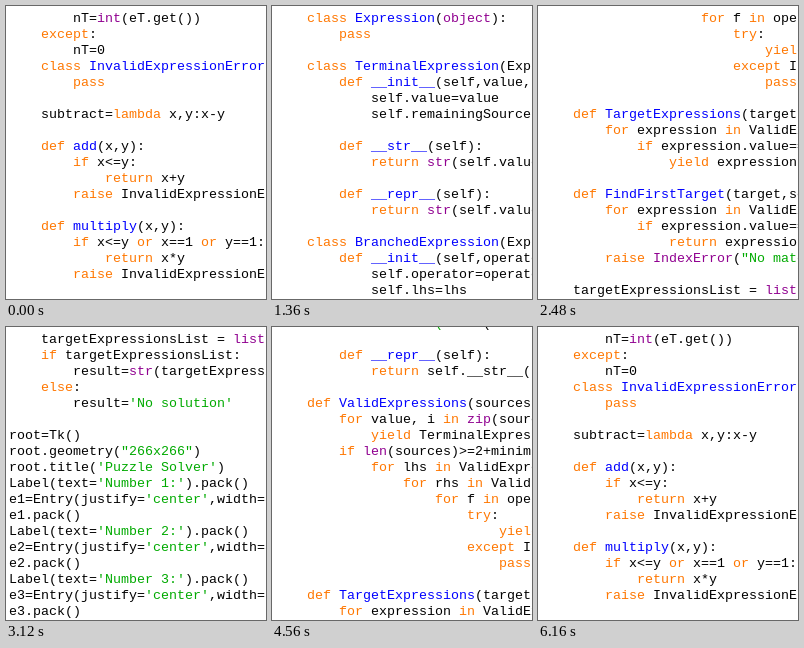
Write an HTML page with a canvas that moves like this. It is 260 px wide and 293 px high and loops after 6.24 s.

```html
<!DOCTYPE html>
<html lang="en">
<head>
<meta charset="utf-8">
<title>Scrolling code</title>
<style>
html, body { margin: 0; width: 100%; height: 100%; overflow: hidden; background: #fff; }
canvas { display: block; }
</style>
</head>
<body>
<canvas id="stage" width="260" height="293"></canvas>
<script id="code" type="text/plain">
        nT=int(eT.get())
    except:
        nT=0
    class InvalidExpressionError(Exception):
        pass

    subtract=lambda x,y:x-y

    def add(x,y):
        if x<=y:
            return x+y
        raise InvalidExpressionError

    def multiply(x,y):
        if x<=y or x==1 or y==1:
            return x*y
        raise InvalidExpressionError

    def divide(x,y):
        if not y or x%y or y==1:
            raise InvalidExpressionError
        return x/y
    def power(x,y):
        if x<=y or x==1 or y==1:
            return x**y
        raise InvalidExpressionError

    add.displayString='+'   #The symbols
    multiply.displayString='*'
    subtract.displayString='-'
    divide.displayString='/'
    power.displayString='**'
    standardOperators=[add, subtract, multiply, divide, power]

    class Expression(object):
        pass

    class TerminalExpression(Expression):
        def __init__(self,value,remainingSources):
            self.value=value
            self.remainingSources=remainingSources

        def __str__(self):
            return str(self.value)

        def __repr__(self):
            return str(self.value)

    class BranchedExpression(Expression):
        def __init__(self,operator,lhs,rhs):
            self.operator=operator
            self.lhs=lhs
            self.rhs=rhs
            self.value=operator(lhs.value,rhs.value)
            self.remainingSources=rhs.remainingSources

        def __str__(self):
            return '('+str(self.lhs)+self.operator.displayString+str(self.rhs)+')'

        def __repr__(self):
            return self.__str__()

    def ValidExpressions(sources,operators=standardOperators):
        for value, i in zip(sources,range(len(sources))):
            yield TerminalExpression(value,sources[:i]+sources[i+1:])
        if len(sources)>=2+minimum:
            for lhs in ValidExpressions(sources,operators):
                for rhs in ValidExpressions(lhs.remainingSources):
                    for f in operators:
                        try:
                            yield BranchedExpression(f,lhs,rhs)
                        except InvalidExpressionError:
                            pass

    def TargetExpressions(target,sources):
        for expression in ValidExpressions(sources):
            if expression.value==target:
                yield expression

    def FindFirstTarget(target,sources):
        for expression in ValidExpressions(sources):
            if expression.value==target:
                return expression
        raise IndexError("No matching expressions")

    targetExpressionsList = list(TargetExpressions(nT,numbers))
    if targetExpressionsList:
        result=str(targetExpressionsList[0])
    else:
        result='No solution'

root=Tk()
root.geometry("266x266")
root.title('Puzzle Solver')
Label(text='Number 1:').pack()
e1=Entry(justify='center',width=5)
e1.pack()
Label(text='Number 2:').pack()
e2=Entry(justify='center',width=5)
e2.pack()
Label(text='Number 3:').pack()
e3=Entry(justify='center',width=5)
e3.pack()
Label(text='Number 4:').pack()
e4=Entry(justify='center',width=5)
e4.pack()
Label(text='Target:').pack()
eT=Entry(justify='center',width=5)
eT.pack()
solve=Button(text='Solve',command=Solve)
solve.pack()
root.mainloop()
</script>
<script>
const ctx = document.getElementById('stage').getContext('2d');
const lines = document.getElementById('code').textContent.replace(/^\n/, '').split('\n');

const STEP = 80, STEPS = 78, LINE = 16, CHAR = 8, LEFT = 3, BASE = 16;
const COLORS = {
  text: '#000000', keyword: '#ff7700', name: '#0000ff',
  builtin: '#900090', string: '#00aa00', comment: '#dd0000'
};
const KEYWORDS = new Set(('class def pass lambda if or not return raise for in yield try ' +
  'except else').split(' '));
const BUILTINS = new Set('int str zip len range list object Exception IndexError'.split(' '));

// [step, first visible line]
const SCROLL = [[0, 0], [17, 34], [31, 68], [44, 95], [47, 92], [57, 58], [69, 15], [77, 0]];

function tokenize(line) {
  const tokens = [];
  let last = '';
  for (const m of line.matchAll(/#.*|'[^']*'|"[^"]*"|\w+|[^\s\w#'"]+/g)) {
    const word = m[0];
    let kind = 'text';
    if (word[0] === '#') kind = 'comment';
    else if (/^['"]/.test(word)) kind = 'string';
    else if (last === 'def' || last === 'class') kind = 'name';
    else if (KEYWORDS.has(word)) kind = 'keyword';
    else if (BUILTINS.has(word) && !last.endsWith('.')) kind = 'builtin';
    tokens.push({ word, col: m.index, color: COLORS[kind] });
    last = word;
  }
  return tokens;
}

const rows = lines.map(tokenize);

function topLine(step) {
  const i = SCROLL.findIndex(k => k[0] >= step);
  if (i === 0) return SCROLL[0][1];
  const [s0, l0] = SCROLL[i - 1], [s1, l1] = SCROLL[i];
  return Math.round(l0 + (l1 - l0) * (step - s0) / (s1 - s0));
}

function draw(step) {
  const top = topLine(step);
  ctx.fillStyle = '#fff';
  ctx.fillRect(0, 0, 260, 293);
  ctx.font = '13.333px "Liberation Mono", "Courier New", monospace';
  ctx.textBaseline = 'alphabetic';
  for (let r = -1; r <= 18; r++) {
    for (const t of rows[top + r] || []) {
      ctx.fillStyle = t.color;
      ctx.fillText(t.word, LEFT + t.col * CHAR, BASE + r * LINE);
    }
  }
}

const start = performance.now();
let shown = -1;

function tick() {
  const step = Math.floor(Math.max(0, performance.now() - start) / STEP) % STEPS;
  if (step !== shown) draw(shown = step);
  requestAnimationFrame(tick);
}
tick();
</script>
</body>
</html>
```
